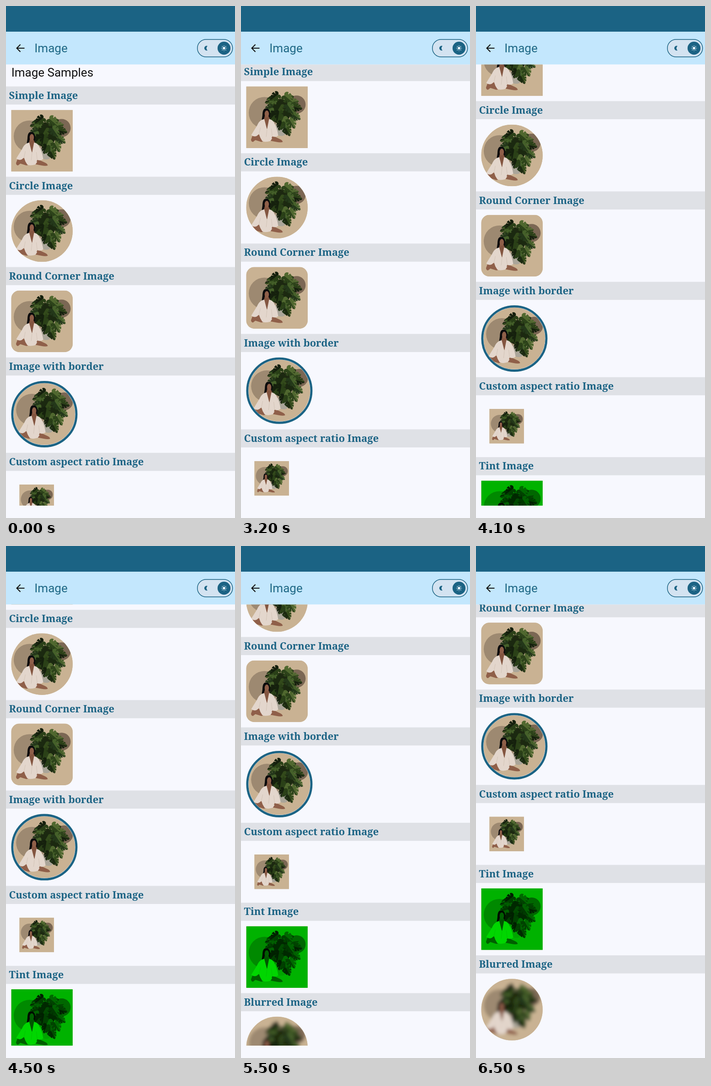
Animation, 501 px wide and 1117 px high, one loop 6600 ms. Source, as an HTML page:

```html
<!DOCTYPE html>
<html lang="en">
<head>
<meta charset="utf-8">
<title>Image samples</title>
<style>
  html, body { margin: 0; width: 100%; height: 100%; overflow: hidden; background: #f7f8fe; }
  svg { display: block; width: 100%; height: 100%; }
  .sans { font: 26px Roboto, sans-serif; }
  .head { font: bold 21.95px "Noto Serif", serif; fill: #1b6384; }
</style>
</head>
<body>
<svg viewBox="0 0 501 1117">
  <defs>
    <clipPath id="view"><rect y="127.5" width="501" height="962.5"/></clipPath>
    <clipPath id="square"><rect width="134.5" height="134.5"/></clipPath>
    <clipPath id="circle"><circle cx="67.25" cy="67.25" r="67.25"/></clipPath>
    <clipPath id="round"><rect width="134.5" height="134.5" rx="18"/></clipPath>
    <filter id="tint" color-interpolation-filters="sRGB">
      <feColorMatrix values="0 0 0 0 0  0 1 0 0 0  0 0 0 0 0  0 0 0 1 0"/>
    </filter>
    <filter id="blur"><feGaussianBlur stdDeviation="3.6"/></filter>
    <path id="half" d="M0 0C2-5 10-5 11.5 2L5 4.5L12 5.5Q12 9 10.5 12L4.5 8.5L9.5 14Q8 17 5.8 19L3 13L4 20.5Q2 23 0 24.5Z"/>
    <g id="pic">
      <rect width="134.5" height="134.5" fill="#c9b293"/>
      <circle cx="40" cy="57.5" r="34.5" fill="#9d8971"/>
      <circle cx="110.3" cy="39.5" r="19.7" fill="#7b6754"/>
      <path d="M64 82H88L86 103Q84 108 77 108Q68 108 67 103Z" fill="#aaa599"/>
      <path d="M66 82H88V86H66Z" fill="#57513f"/>
      <ellipse cx="74" cy="54" rx="24" ry="27" fill="#1d2811"/>
      <g id="plant"></g>
      <!-- seated figure -->
      <path d="M44 48C36 48 36 56 35.500 63C35 69 32 76 37 80Q42 77 42 70L51 70Q54 58 51 53Q49 48 44 48Z" fill="#0b0b0c"/>
      <path d="M15 104L10.500 116Q11 121 15 121L20 117L33 121L50 118L66 121Q76 123 80 121Q79 117 74 115L59 108L21 104Z" fill="#8f5f49"/>
      <path d="M41 63H48L53 74L46 94L38 74Z" fill="#835540"/>
      <path d="M39.500 71C31 73 27 78 24 85L11 106Q17 111 23 108L28 104Q30 112 35 119Q45 122 53 118L57 109Q65 112 70 107Q68 92 61 79Q58 73 50 71L45.500 94Z" fill="#e3d6cc"/>
      <path d="M28 104L31 90M57 109L55 92M45.500 94L43 117" stroke="#cfbfb2" stroke-width=".8" fill="none"/>
      <path d="M37 117Q46 105 49 111L57 113L53 119Q44 122 36 120Z" fill="#e3d6cc"/>
      <ellipse cx="45" cy="60" rx="4.700" ry="7.500" fill="#8f5f49"/>
    </g>
  </defs>

  <rect width="501" height="1117" fill="#f7f8fe"/>
  <g clip-path="url(#view)">
    <g id="list"><text class="sans" x="11.700" y="154" fill="#111">Image Samples</text></g>
  </g>

  <rect width="501" height="56" fill="#1b6384"/>
  <rect y="56" width="501" height="71.500" fill="#c3e7fd"/>
  <path d="M40.500 92H24M31.500 84L23.500 92L31.500 100" fill="none" stroke="#111" stroke-width="2.100"/>
  <text class="sans" x="62.300" y="101.300" fill="#1f6886">Image</text>
  <rect x="418.700" y="73" width="77" height="38" rx="19" fill="#d3e3f1" stroke="#1b6384" stroke-width="1.500"/>
  <path d="M441 87.200A5.200 5.200 0 1 0 441 96.800A5.800 5.800 0 0 1 441 87.200Z" fill="#1b6384"/>
  <circle cx="477" cy="92" r="14.200" fill="#1b6384"/>
  <circle cx="477" cy="92" r="3" fill="#e4f1fa"/>
  <circle cx="477" cy="92" r="5.300" fill="none" stroke="#e4f1fa" stroke-width="1.700" pathLength="16" stroke-dasharray=".7 1.3" stroke-dashoffset=".35"/>
</svg>
<script>
const $ = id => document.getElementById(id);

// Leaves: x, y, angle, scale
const leaves = [
  [62, 30, 75, .9], [57, 46, 70, .8], [63, 60, 40, .95], [82, 66, 25, 1],
  [93, 54, -45, .95], [85, 82, -10, 1], [78, 78, 20, .8], [95, 72, -30, .95],
  [88, 92, -25, .75], [104, 62, -55, .75], [104, 44, -75, .8], [97, 34, -95, .75],
  [86, 28, -110, .8], [66, 30, 100, .85], [70, 18, 55, .9], [84, 20, -50, 1],
  [76, 40, 30, 1], [90, 40, -35, .95], [72, 55, 10, .85]
];
const greens = [['#1b2910', '#334a1b'], ['#24381a', '#45602a'], ['#15200d', '#2a4017'], ['#2d431a', '#50682f']];
$('plant').innerHTML = leaves.map(([x, y, turn, size], i) => {
  const [dark, light] = greens[i % greens.length];
  return `<g transform="translate(${x} ${y}) rotate(${turn}) scale(${size})">
    <use href="#half" fill="${light}"/><use href="#half" fill="${dark}" transform="scale(-1 1)"/></g>`;
}).join('');

const pic = (x, y, clip, scale = 1, filter = '') =>
  `<g transform="translate(${x} ${y}) scale(${scale})" clip-path="url(#${clip})">
    <rect width="134.5" height="134.5" fill="#c9b293"/>
    <use href="#pic" ${filter && `filter="url(#${filter})"`}/></g>`;

// Section heading, top of its band, picture below
const sections = [
  ['Simple Image', 175.5, y => pic(11.4, y, 'square')],
  ['Circle Image', 372.5, y => pic(11.4, y, 'circle')],
  ['Round Corner Image', 569.5, y => pic(11.4, y, 'round')],
  ['Image with border', 766.7, y => pic(16.6, y + 5.2, 'circle') +
    `<circle cx="83.9" cy="${y + 72.5}" r="70.1" fill="none" stroke="#1b6384" stroke-width="4.8"/>`],
  ['Custom aspect ratio Image', 974.8, y => pic(29.3, y + 18, 'square', .562)],
  ['Tint Image', 1149.2, y => pic(11.4, y, 'square', 1, 'tint')],
  ['Blurred Image', 1346.5, y => pic(11.4, y, 'circle', 1, 'blur')]
];
$('list').innerHTML += sections.map(([name, y, draw]) =>
  `<rect y="${y}" width="501" height="39.5" fill="#dfe1e6"/>
   <text class="head" x="6.6" y="${y + 27.2}">${name}</text>${draw(y + 51.2)}`).join('');

// Scroll: time in ms, offset
const keys = [[0, 0], [2700, 0], [2800, 7.5], [3600, 95], [4100, 165], [4800, 284.5],
  [5100, 364], [5400, 364], [5500, 371], [6100, 453.5], [6600, 453.5]];

function scrollAt(t) {
  const i = keys.findIndex(k => k[0] > t);
  const [t0, y0] = keys[i - 1], [t1, y1] = keys[i];
  return y0 + (y1 - y0) * (t - t0) / (t1 - t0);
}

const start = performance.now();
function frame() {
  const t = (performance.now() - start) % 6600;
  const step = Math.floor(t / 100) * 100;
  $('list').setAttribute('transform', `translate(0 ${-scrollAt(step)})`);
  requestAnimationFrame(frame);
}
frame();
</script>
</body>
</html>
```
